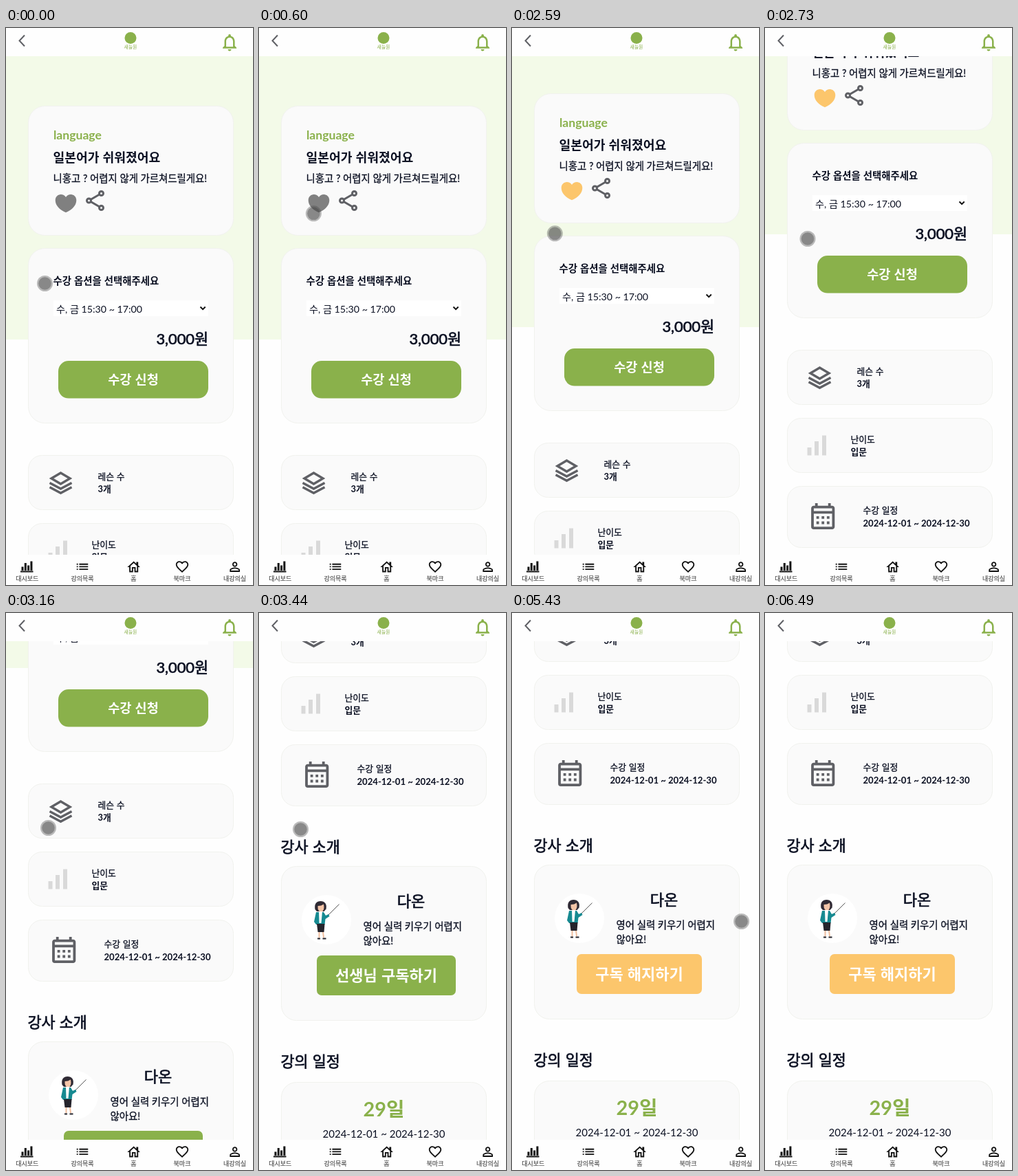
Animation of 359 by 810 pixels, one loop 7350 ms. Source, as an HTML page:

```html
<!DOCTYPE html>
<html lang="ko">
<head>
<meta charset="utf-8">
<title>강의 상세</title>
<style>
  html, body { margin: 0; width: 100%; height: 100%; overflow: hidden; background: #fefefe; }
  svg { display: block; width: 359px; height: 810px; }
  text { font-family: Lato, "Noto Sans CJK KR", "Noto Sans CJK", sans-serif; fill: #0b1022; }
  .kr { font-family: "Noto Sans CJK KR", "Noto Sans CJK", sans-serif; }
  /* weights between regular and bold */
  .m { stroke: #0b1022; stroke-width: .3px; }
  .h { stroke: #0b1022; stroke-width: .7px; }
  .b { font-weight: 700; }
  .mid { text-anchor: middle; }
  .s12 { font-size: 12.8px; }
  .s14 { font-size: 14.4px; }
  .s22 { font-size: 22px; }
  .green { fill: #8ab14b; }
  .white { fill: #fff; }
  .card { fill: #fafafa; stroke: #f1f2ee; }
  .line { fill: none; stroke: #5f6065; }
  .nav text { font-size: 9px; fill: #555; stroke: #555; stroke-width: .2px; text-anchor: middle; }
  .ink { fill: none; stroke: #111; stroke-width: 2; }
</style>
</head>
<body>
<svg viewBox="0 0 359 810">
  <rect width="359" height="810" fill="#fefefe"/>

  <g id="page">
    <rect width="359" height="453" fill="#f3fae8"/>
    <g class="card">
      <rect x="32.5" y="113.5" width="298" height="188" rx="24"/>
      <rect x="32.5" y="320.5" width="298" height="254" rx="24"/>
      <rect x="32.5" y="621.5" width="298" height="79" rx="20"/>
      <rect x="32.5" y="720.5" width="298" height="79" rx="20"/>
      <rect x="32.5" y="819.5" width="298" height="89" rx="20"/>
      <rect x="32.5" y="996.5" width="298" height="224" rx="22"/>
      <rect x="32.5" y="1310.5" width="298" height="220" rx="22"/>
    </g>

    <text class="b green" x="69" y="162" font-size="17.6">language</text>
    <text class="kr b" x="68.5" y="194.5" font-size="18.2">일본어가 쉬워졌어요</text>
    <text class="m s14" x="68.5" y="223.5">니홍고 ? 어렵지 않게 가르쳐드릴게요!</text>
    <path id="like" d="M87 268.3C78 264.500 71.700 258 71.700 250.500c0-5 3.800-8.500 8-8.500 3 0 5.700 1.500 7.300 4 1.600-2.500 4.300-4 7.300-4 4.200 0 8 3.500 8 8.500 0 7.500-6.300 14-15.300 17.800z"/>
    <g class="line" stroke-width="3">
      <path d="M138.500 240.500 120.500 251 138.500 261.500"/>
      <g fill="#fafafa">
        <circle cx="120.500" cy="251" r="3"/>
        <circle cx="138.500" cy="240.500" r="3"/>
        <circle cx="138.500" cy="261.500" r="3"/>
      </g>
    </g>

    <text class="kr b s14" x="68.5" y="373">수강 옵션을 선택해주세요</text>
    <rect x="69" y="396" width="225" height="23" fill="#fff"/>
    <text x="73" y="413.5" font-size="14.2">수, 금 15:30 ~ 17:00</text>
    <path class="ink" d="M282.5 405.5l3.6 3.6 3.6-3.6"/>
    <text class="h" x="294" y="460" font-size="21.8" text-anchor="end">3,000원</text>
    <rect class="green" x="76" y="484" width="218" height="54.6" rx="15"/>
    <text class="kr b white mid" x="185" y="518" font-size="18.6">수강 신청</text>

    <g class="line" stroke-width="3.4">
      <path d="M66 655 79.500 647 93 655 79.500 663Z"/>
      <path d="M63.500 661.500 79.500 670 95.500 661.500M63.500 667.800 79.500 676.300 95.500 667.800"/>
    </g>
    <text class="kr m s12" x="133.5" y="657">레슨 수</text>
    <text class="b s12" x="133.5" y="675">3개</text>

    <path fill="#d9d9d9" d="M61.5 763h6v11.500h-6zM72 754h6v20.500h-6zM83 745.500h6v29h-6z"/>
    <text class="kr m s12" x="124.5" y="756">난이도</text>
    <text class="kr b s12" x="124.5" y="774">입문</text>

    <path fill="#5f6065" transform="translate(61.4 840.2) scale(1.9)" d="M19 4h-1V2h-2v2H8V2H6v2H5c-1.11 0-1.99.9-1.99 2L3 20a2 2 0 0 0 2 2h14c1.1 0 2-.9 2-2V6c0-1.1-.9-2-2-2zm0 16H5V10h14v10zm0-12H5V6h14v2zM9 14H7v-2h2v2zm4 0h-2v-2h2v2zm4 0h-2v-2h2v2zm-8 4H7v-2h2v2zm4 0h-2v-2h2v2zm4 0h-2v-2h2v2z"/>
    <text class="kr m s12" x="142.5" y="859">수강 일정</text>
    <text class="b" x="142.5" y="877.5" font-size="13.1">2024-12-01 ~ 2024-12-30</text>

    <text class="kr h" x="31.5" y="976" font-size="21.8">강사 소개</text>
    <circle class="white" cx="98" cy="1074" r="36"/>
    <g transform="translate(0 630)">
      <path d="M100 438 116.5 421.5" stroke="#444" stroke-width=".9"/>
      <path d="M81.5 429c-1.500-8 2-12 8-12s9.500 4 8 11.500l-3 3.500H84z" fill="#302b35"/>
      <path d="M85.500 424q5 0 8.500-2.500 2 10-4 11.500-5-1-4.500-9z" fill="#f4c5a8"/>
      <path d="M83 433h11l3 5 4-2 1.500 3-6 4-1 8H83l-3-4z" fill="#168a91"/>
      <path d="M87 432h5l-1.500 17h-3z" fill="#fff"/>
      <path d="M84 450h11.500l-1 12h-9z" fill="#25242c"/>
      <path d="M87.500 462v8M93 462l1 8" stroke="#f0bd9d" stroke-width="2"/>
      <path d="M85 471.500h4M92.500 471.500h5" stroke="#25242c" stroke-width="2"/>
    </g>
    <text class="kr h s22 mid" x="221" y="1054.5">다온</text>
    <text class="m s14" x="151.5" y="1089">영어 실력 키우기 어렵지</text>
    <text class="m s14" x="151.5" y="1110">않아요!</text>
    <rect id="btn" y="1126" height="58" rx="7"/>
    <text id="label" class="kr b s22 white mid" x="185" y="1163"></text>

    <text class="kr h" x="31.5" y="1288" font-size="21.8">강의 일정</text>
    <text class="b green mid" x="181.5" y="1359.5" font-size="28.8">29일</text>
    <text class="mid" x="181.5" y="1391" font-size="15">2024-12-01 ~ 2024-12-30</text>
  </g>

  <!-- header -->
  <rect width="359" height="41" fill="#fefefe"/>
  <path class="line" stroke-width="2" d="M27 10.5 19.5 18.5 27 26.5"/>
  <circle class="green" cx="181" cy="14.5" r="8.5"/>
  <text class="kr green mid" x="181" y="30" font-size="6.8">새늘원</text>
  <path class="green" transform="translate(310 5.9) scale(1.25)" d="M12 22c1.1 0 2-.9 2-2h-4c0 1.1.9 2 2 2zm6-6v-5c0-3.07-1.63-5.64-4.5-6.32V4c0-.83-.67-1.5-1.5-1.5s-1.5.67-1.5 1.5v.68C7.64 5.36 6 7.92 6 11v5l-2 2v1h16v-1l-2-2zm-2 1H8v-6c0-2.48 1.51-4.5 4-4.5s4 2.02 4 4.5v6z"/>

  <!-- tab bar -->
  <g class="nav" fill="#111">
    <rect y="766" width="359" height="44" fill="#fefefe"/>
    <path d="M21 789.5h18.5v2H21zM22.500 783.500h3v5.500h-3zM26.800 778h3v11h-3zM31.100 781.500h3v7.500h-3zM35.400 775.500h3v13.500h-3z"/>
    <path transform="translate(100 772.4) scale(.917)" d="M3 13h2v-2H3v2zm0 4h2v-2H3v2zm0-8h2V7H3v2zm4 4h14v-2H7v2zm0 4h14v-2H7v2zM7 7v2h14V7H7z"/>
    <path transform="translate(174.5 772.8) scale(.93)" d="M19 9.300V4h-3v2.600L12 3 2 12h3v8h6v-6h2v6h6v-8h3l-3-2.700zM17 18h-2v-6H9v6H7v-7.810l5-4.500 5 4.500V18z"/>
    <path transform="translate(245 772.4) scale(.917)" d="M16.5 3c-1.74 0-3.41.81-4.5 2.09C10.91 3.81 9.24 3 7.5 3 4.42 3 2 5.42 2 8.5c0 3.78 3.4 6.86 8.55 11.54L12 21.35l1.45-1.32C18.6 15.36 22 12.28 22 8.5 22 5.42 19.58 3 16.5 3zm-4.4 15.55l-.1.1-.1-.1C7.14 14.24 4 11.39 4 8.5 4 6.5 5.5 5 7.5 5c1.54 0 3.04.99 3.57 2.36h1.87C13.46 5.99 14.96 5 16.5 5c2 0 3.5 1.5 3.5 3.5 0 2.89-3.14 5.74-7.9 10.05z"/>
    <path transform="translate(321.6 772.6) scale(.917)" d="M12 6c1.1 0 2 .9 2 2s-.9 2-2 2-2-.9-2-2 .9-2 2-2m0 9c2.7 0 5.8 1.29 6 2v1H6v-.99c.2-.72 3.3-2.01 6-2.01m0-11C9.79 4 8 5.79 8 8s1.79 4 4 4 4-1.79 4-4-1.79-4-4-4zm0 9c-2.67 0-8 1.34-8 4v3h16v-3c0-2.66-5.33-4-8-4z"/>
    <text class="kr" x="30.7" y="804">대시보드</text>
    <text class="kr" x="111" y="804">강의목록</text>
    <text class="kr" x="185.5" y="804">홈</text>
    <text class="kr" x="256" y="804">북마크</text>
    <text class="kr" x="332.5" y="804">내강의실</text>
  </g>

  <g id="cursor" fill="#464646">
    <circle r="11.5" opacity=".36"/>
    <circle r="9.3" opacity=".42"/>
  </g>
</svg>
<script>
const LOOP = 7350, GREEN = '#8ab14b', ORANGE = '#fcc66c';
const $ = id => document.getElementById(id);
const page = $('page'), like = $('like'), btn = $('btn'), label = $('label'), cursor = $('cursor');

// Pointer moves: first jump, last jump, jump count, end x, end y
const moves = [
  [70, 750, 10, 82, 258],
  [900, 980, 2, 84, 256],
  [1440, 1440, 1, 68.5, 283.5],
  [1520, 1520, 1, 62.5, 295],
  [2590, 2730, 3, 62, 306.5],
  [2800, 3160, 5, 61.5, 312.5],
  [3230, 3440, 4, 60.5, 314.5],
  [3510, 3840, 5, 112, 445],
  [3910, 4330, 7, 157.5, 518.5],
  [4880, 5230, 6, 333.5, 448.5]
];

// Scroll bursts: start time, then offsets every 70 ms
const bursts = [
  [2590, [18, 74, 153, 226, 280, 307, 315]],
  [3160, [373, 472, 566, 613, 628, 630]]
];

const ease = u => u * u * (3 - 2 * u);

function pointerAt(t) {
  let x = 56.5, y = 371.5;
  for (const [from, to, n, ex, ey] of moves) {
    if (t < from) break;
    const gap = n > 1 ? (to - from) / (n - 1) : 1;
    const k = Math.min(n, Math.floor((t - from) / gap + 0.001) + 1);
    const u = n > 4 ? ease(k / n) : k / n;
    x += (ex - x) * u;
    y += (ey - y) * u;
  }
  return [x, y];
}

function scrollAt(t) {
  let top = 0;
  for (const [from, tops] of bursts) {
    if (t >= from) top = tops[Math.min(tops.length - 1, Math.floor((t - from) / 70))];
  }
  return top;
}

function draw(t) {
  const [x, y] = pointerAt(t);
  cursor.setAttribute('transform', `translate(${x} ${y})`);
  cursor.style.display = t < 6490 ? '' : 'none';
  page.setAttribute('transform', `translate(0 ${-scrollAt(t)})`);
  like.setAttribute('fill', t < 1980 ? '#808080' : ORANGE);

  const joined = t >= 5430;
  btn.setAttribute('fill', t < 4480 ? GREEN : t < 4550 ? '#c3bc5c' : ORANGE);
  btn.setAttribute('x', joined ? 94 : 84);
  btn.setAttribute('width', joined ? 182 : 202);
  label.textContent = joined ? '구독 해지하기' : '선생님 구독하기';
}

const start = performance.now();
function tick() {
  draw((performance.now() - start) % LOOP);
  requestAnimationFrame(tick);
}
tick();
</script>
</body>
</html>
```
